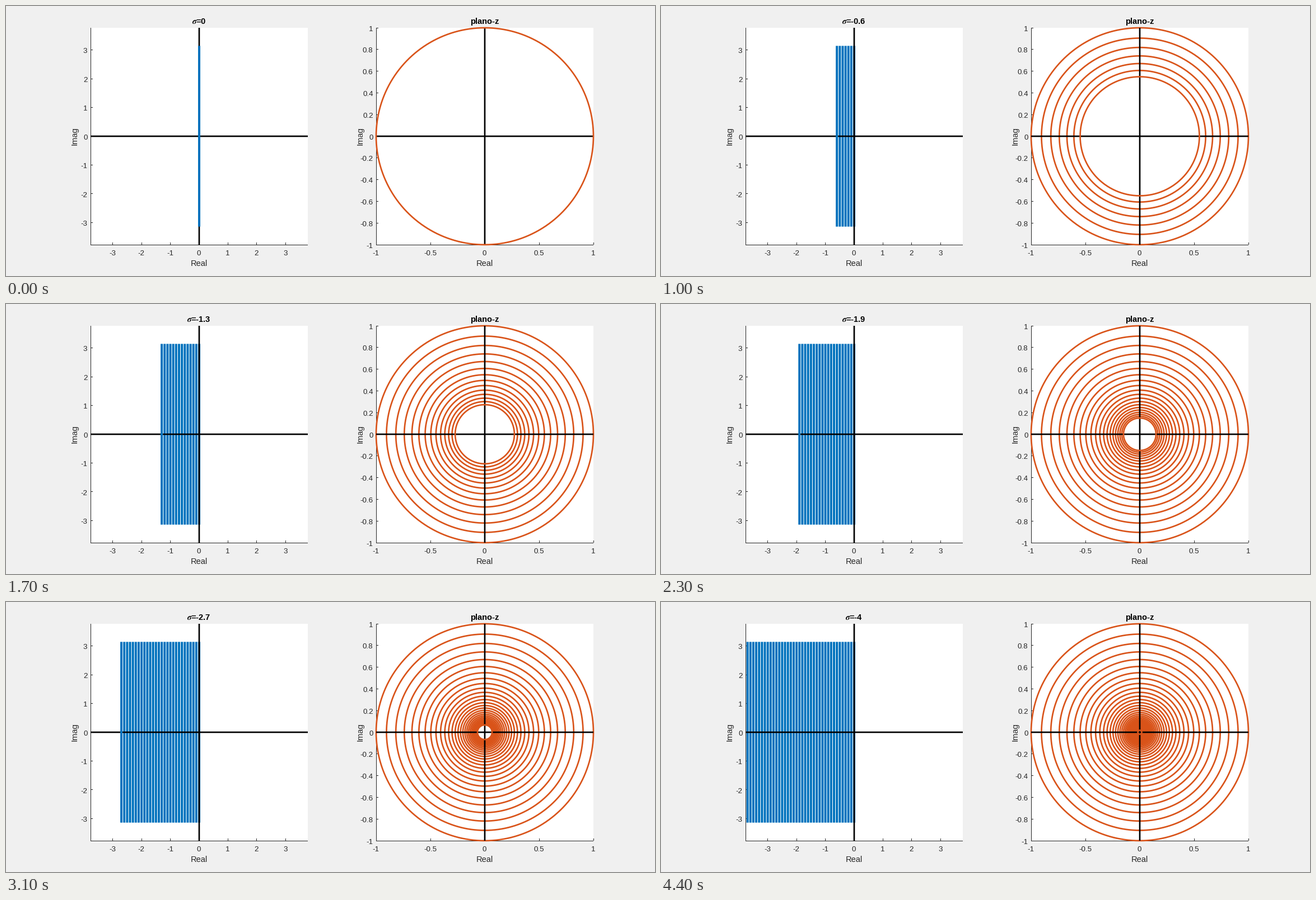
Animation of 1159 by 483 pixels, one loop 4500 ms. Source, as a matplotlib script:

```python
import math

import numpy as np
import matplotlib.pyplot as plt
from matplotlib.animation import FuncAnimation
from matplotlib.patches import Rectangle

W, H, DPI = 1159, 483, 64
PT = 72 / DPI                      # points per pixel
BLUE, ORANGE, INK = "#0072BD", "#D95319", "#262626"
TOP, SIZE = 39, 388                # plot box, in pixels
HALF = SIZE / 2
CY = TOP + HALF
STEPS, HOLD = 40, 4                # sigma steps; frames held before the first

plt.rcParams["font.family"] = "Liberation Sans"
plt.rcParams["mathtext.fontset"] = "stix"

fig = plt.figure(figsize=(W / DPI, H / DPI), dpi=DPI, facecolor="#F0F0F0")
ax = fig.add_axes([0, 0, 1, 1])
ax.set_xlim(0, W)
ax.set_ylim(H, 0)
ax.axis("off")


def line(xs, ys, color, width, z):
    return ax.plot(xs, ys, color=color, lw=width * PT, zorder=z, snap=False,
                   solid_capstyle="butt", solid_joinstyle="round")[0]


def text(x, y, s, px=13.33, color=INK, **kw):
    kw.setdefault("ha", "center")
    return ax.text(x, y, s, fontsize=px * PT, color=color, va="baseline", **kw)


def bar(x, y, w, h, color, z):
    ax.add_patch(Rectangle((x, y), w, h, fc=color, lw=0, zorder=z, snap=False))


def panel(left, lim, xticks, yticks, title):
    """Draw one plot with its ticks, labels and black axes; return the title."""
    cx, bottom = left + HALF, TOP + SIZE
    bar(left, TOP, SIZE, SIZE, "white", 0)
    bar(left, TOP, 1, SIZE + 1, INK, 1)
    bar(left, bottom, SIZE, 1, INK, 1)
    for v in xticks:
        x = cx + v / lim * HALF
        bar(math.floor(x), bottom - 4, 1, 4, INK, 1)
        text(x - 0.5, 446, f"{v:g}")
    for v in yticks:
        y = CY - v / lim * HALF
        bar(left, math.floor(y), 4, 1, INK, 1)
        text(left - 5.5, y + 5.6, f"{v:g}", ha="right")
    text(cx - 0.5, 465, "Real", 14.67)
    text(left - 24, CY, "Imag", 14.67, rotation=90, rotation_mode="anchor")
    line([left, left + SIZE], [CY, CY], "black", 2.67, 3)
    line([cx, cx], [TOP, bottom], "black", 2.67, 3)
    return text(cx - 0.5, 32, title, 14.67, "black", weight="bold")


S_LIM = 1.2 * math.pi
S_LEFT, Z_LEFT = 151, 661
units = range(-3, 4)
fifths = [k / 5 for k in range(-5, 6)]
halves = [k / 2 for k in range(-2, 3)]
sigma_title = panel(S_LEFT, S_LIM, units, units, "")
panel(Z_LEFT, 1, halves, fifths, "plano-z")

# Each vertical line s = sigma + jw maps to the circle |z| = exp(sigma).
w = np.linspace(-math.pi, math.pi, 361)
scale = HALF / S_LIM
pairs = []
for n in range(STEPS + 1):
    sigma = -n / 10
    r = HALF * math.exp(sigma)
    pair = [line(Z_LEFT + HALF + r * np.cos(w), CY - r * np.sin(w),
                 ORANGE, 2.67, 2)]
    if abs(sigma) < S_LIM:
        x = S_LEFT + HALF + sigma * scale
        reach = math.pi * scale
        pair.append(line([x, x], [CY - reach, CY + reach], BLUE, 4, 2))
    pairs.append(pair)


def update(frame):
    last = max(0, frame - HOLD)
    for n, pair in enumerate(pairs):
        for curve in pair:
            curve.set_visible(n <= last)
            curve.set_zorder(4 if n == last else 2)   # newest covers the axes
    sigma_title.set_text(rf"$\boldsymbol{{\sigma}}$={-last / 10:g}")
    return [sigma_title] + [c for pair in pairs for c in pair]


anim = FuncAnimation(fig, update, frames=STEPS + HOLD + 1, interval=100,
                     repeat=True, repeat_delay=0, blit=False)
plt.show()
```
